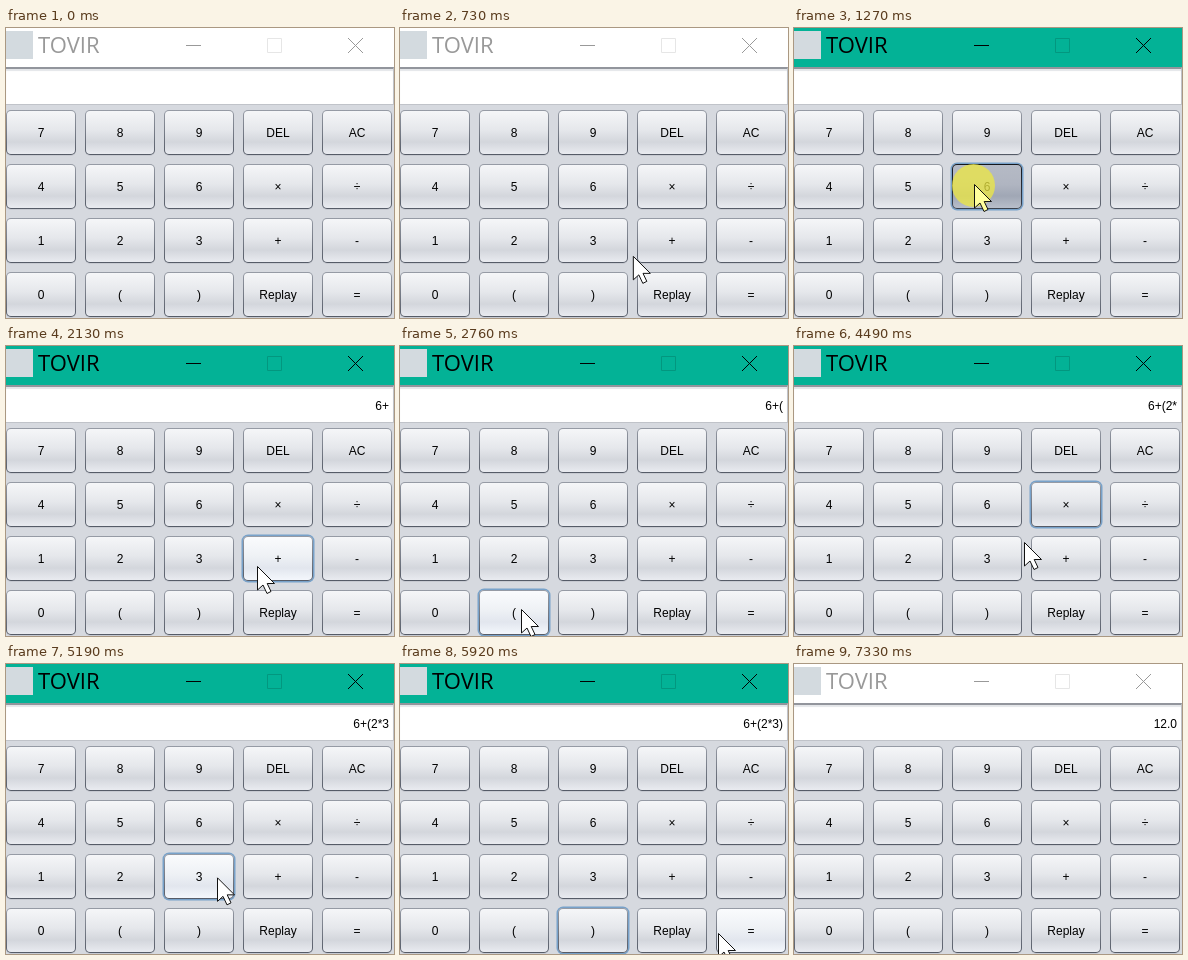
An HTML page for the animation above (7.37 s loop, 388 by 290 pixels).

```html
<!DOCTYPE html>
<html lang="en">
<head>
<meta charset="utf-8">
<title>Calculator</title>
<style>
html, body { margin: 0; width: 100%; height: 100%; overflow: hidden; }
body { position: relative; background: #d6d9df; font: 12px "Liberation Sans", Arial, sans-serif; color: #000; }
body > *, #bar > * { position: absolute; box-sizing: border-box; }
#bar { left: 0; top: 0; width: 388px; height: 39px; background: #fff; color: #999; --off: #e6e6e6; }
#bar.active { background: #03b296; color: #000; --off: #03977f; }
#icon { left: 0; top: 3px; width: 27px; height: 28px; background: #d3dadf; }
#name { left: 32px; top: 1px; font: 22px/30px "Open Sans", "Noto Sans", sans-serif; }
#controls { left: 0; top: 0; fill: none; stroke: currentColor; }
#field {
  left: 0; top: 39px; width: 388px; height: 38px; padding-right: 4px;
  background: #fff; border: solid #c0c3c9; border-width: 2px 1px 1px 0; border-top-color: #92959c;
  box-shadow: inset 0 2px 1px #e4e6e9; text-align: right; line-height: 38px;
}
.key {
  width: 70px; height: 45px; border: 1px solid transparent; border-radius: 5px;
  text-align: center; line-height: 44px;
  --fill: #f5f6f8, #e5e7eb 45%, #d3d6dc 72%, #e9ebf0;
  --edge: #969ba5, #555b67;
  background: linear-gradient(var(--fill)) padding-box, linear-gradient(var(--edge)) border-box;
  box-shadow: 0 1px #c7cad1;
}
.hover { --fill: #fafbfd, #eef1f5 45%, #e2e6ee 72%, #f4f7fc; }
.down { --fill: #b5bac5, #b0b5c1 45%, #a0a7b5 72%, #b8beca; --edge: #14171d, #3c434f; }
.focus { box-shadow: 0 0 0 1.5px #78a2ca; }
#spot { width: 43px; height: 43px; margin: -21px 0 0 -23px; border-radius: 50%; background: rgba(238, 232, 66, .75); }
#cursor { left: 0; top: 0; overflow: visible; fill: #fff; stroke: #111; }
</style>
</head>
<body>
<div id="bar">
  <div id="icon"></div>
  <div id="name">TOVIR</div>
  <svg id="controls" width="388" height="39">
    <path d="M180 17.5h15"/>
    <path d="M261.5 10.5h14v14h-14z" stroke="var(--off)"/>
    <path d="M342 10l15 15m0-15l-15 15"/>
  </svg>
</div>
<div id="field"></div>
<div id="spot"></div>
<svg id="cursor" width="20" height="30"><path d="M-.5 -.5V23L5 18L9 26.5L13 24.5L9.2 16.5H16.5Z"/></svg>
<script>
const LOOP = 7370, ACTIVE = [1270, 7330], SHOWN = [430, 6570];
const $ = id => document.getElementById(id);
const within = (t, [a, b]) => t >= a && t < b;

const labels = "7 8 9 DEL AC 4 5 6 × ÷ 1 2 3 + - 0 ( ) Replay =".split(" ");
const keys = labels.map((label, i) => {
  const el = document.createElement("div");
  const x = i % 5 * 79, y = 82 + Math.floor(i / 5) * 54;
  el.className = "key";
  el.textContent = label;
  el.style.left = x + "px";
  el.style.top = y + "px";
  $("spot").before(el);
  return { label, el, x, y };
});

// press time, release time, key, display after release
const presses = [
  [1270, 1370, "6", "6"],
  [1930, 2030, "+", "6+"],
  [2620, 2760, "(", "6+("],
  [3550, 3620, "2", "6+(2"],
  [4290, 4390, "×", "6+(2*"],
  [5030, 5130, "3", "6+(2*3"],
  [5600, 5720, ")", "6+(2*3)"],
  [6120, 6230, "=", "12.0"]
];

// pointer moves: start, end, destination
const start = [278, 289];
const moves = [
  [430, 1070, 181, 157],
  [1370, 1730, 244, 208],
  [2030, 2110, 252, 221],
  [2160, 2570, 122, 264],
  [2780, 3420, 124, 221],
  [3690, 4250, 258, 166],
  [4390, 4490, 231, 197],
  [4560, 4950, 212, 211],
  [5130, 5520, 212, 262],
  [5790, 5920, 319, 270],
  [5950, 6080, 338, 266],
  [6270, 6540, 380, 288]
];

function pointer(t) {
  let [x, y] = start;
  for (const [a, b, tx, ty] of moves) {
    const p = Math.min(1, Math.max(0, (t - a) / (b - a)));
    const e = p * p * (3 - 2 * p);
    x += (tx - x) * e;
    y += (ty - y) * e;
  }
  return [x, y];
}

function draw(now) {
  const t = now % LOOP;
  const active = within(t, ACTIVE), shown = within(t, SHOWN);
  const [x, y] = pointer(t);
  const last = presses.filter(p => t >= p[0]).pop();
  const down = !!last && t < last[1];
  const done = presses.filter(p => t >= p[1]).pop();

  $("bar").classList.toggle("active", active);
  $("field").textContent = done ? done[3] : "";
  for (const k of keys) {
    const focus = active && !!last && last[2] === k.label;
    const over = shown && within(x, [k.x, k.x + 70]) && within(y, [k.y, k.y + 45]);
    k.el.classList.toggle("focus", focus);
    k.el.classList.toggle("down", focus && down);
    k.el.classList.toggle("hover", over && !(focus && down));
  }

  $("cursor").style.display = shown ? "" : "none";
  $("cursor").style.transform = `translate(${x}px, ${y}px)`;
  $("cursor").style.fill = down ? "#ffff9c" : "#fff";
  $("spot").style.display = down ? "" : "none";
  $("spot").style.left = x + "px";
  $("spot").style.top = y + "px";
  requestAnimationFrame(draw);
}
requestAnimationFrame(draw);
</script>
</body>
</html>
```
